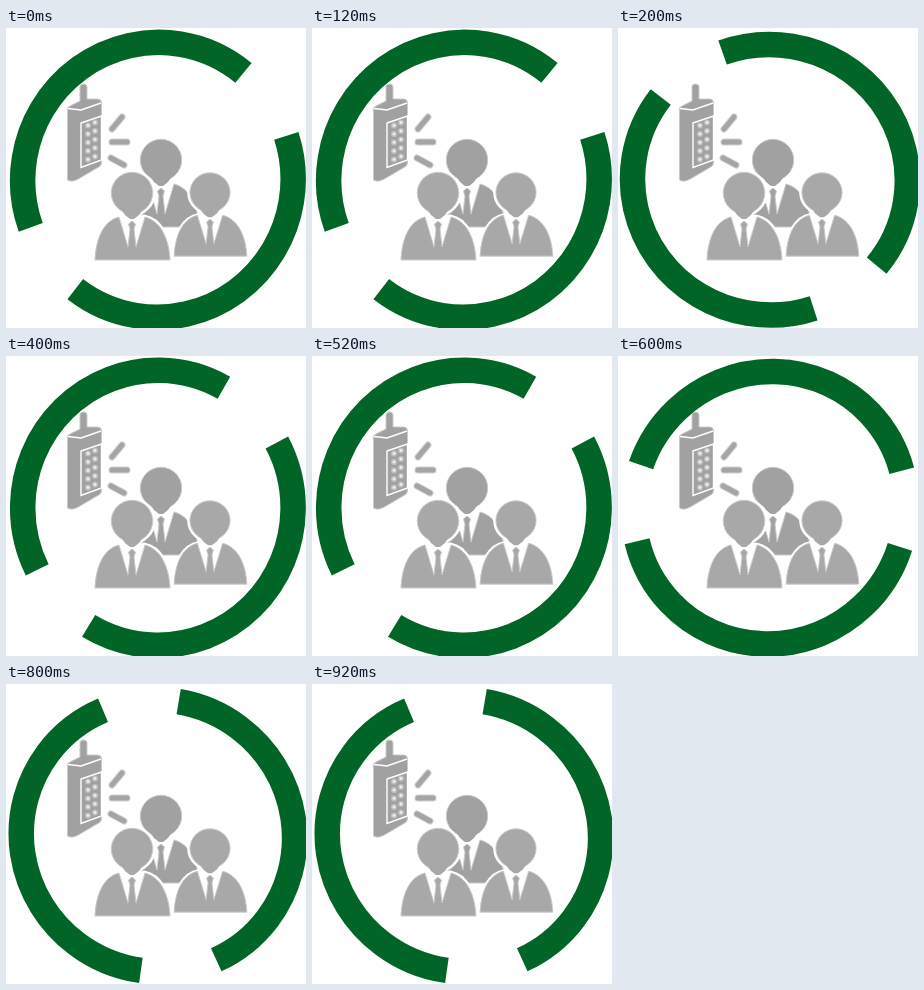
Animation, 300 px wide and 300 px high, one loop 1 s. Source, as an HTML page:

```html
<!DOCTYPE html>
<html lang="en">
<head>
<meta charset="utf-8">
<title>Group call</title>
<style>
  html, body { margin: 0; width: 100%; height: 100%; overflow: hidden; background: #fff; }
  svg { display: block; width: 100%; height: 100%; }
</style>
</head>
<body>
<svg viewBox="0 0 300 300">
  <defs>
    <!-- origin at the centre of the head -->
    <g id="person">
      <g fill="#fff" stroke="#fff" stroke-width="5">
        <circle r="21"/>
        <path d="M-37 67C-36 46 -29 27 -11 24H12C29 27 37 46 38 67Z"/>
      </g>
      <circle r="20.7"/>
      <path d="M-11 16L-7 22L-2 26H2L7 22L11 16Z" stroke="none"/>
      <path d="M-37 67C-36 46 -29 28 -13 24L-4 54L-2 36L-3.500 31L0 28L3.500 31L2 36L4 54L13 24C29 28 37 46 38 67Z"/>
    </g>
    <path id="waves" d="M106 101L116 89M106 114H121M105 130L118 137"/>
  </defs>

  <g fill="#a1a1a1" stroke="#cacaca">
    <use href="#person" x="155" y="132"/>
    <g fill="#a8a8a8">
      <use href="#person" transform="translate(204 164.500) scale(.97 .95)"/>
      <use href="#person" x="126" y="165"/>
    </g>

    <path d="M74 73V59Q74 56 77.500 56Q81 56 81 59V71H92Q95.500 71 95.500 75V134Q96 138 91 140L74 150Q66 155 61.500 152V82Q61 79 64 78Z"/>
    <path d="M62 80.500L75 82L95 75M75 95L95.500 88V132L75 139.500Z" fill="none" stroke="#fff" stroke-width="1.400"/>
    <g id="keys" fill="#eee" stroke="#c0c0c0" stroke-width="1.500"></g>

    <g fill="none" stroke-linecap="round">
      <use href="#waves" stroke="#d0d0d0" stroke-width="7"/>
      <use href="#waves" stroke="#a5a5a5" stroke-width="5"/>
    </g>
  </g>

  <g transform="translate(151.900 151.800)">
    <ellipse id="ring" rx="137.500" ry="135.200" fill="none" stroke="#006526" stroke-width="25.500"
      pathLength="360" stroke-dasharray="146 32.400 149.200 32.400" stroke-dashoffset="-62"/>
  </g>
</svg>
<script>
  const ring = document.getElementById("ring");
  const keys = document.getElementById("keys");
  const turns = [-80.7, 9.4, 91, 136.5, 217];
  const hold = 200;

  for (let i = 0; i < 10; i++) {
    const col = i % 2, row = i >> 1;
    keys.innerHTML += `<circle cx="${82 + 7 * col}" cy="${97.5 + 8.5 * row - 3 * col}" r="2.2"/>`;
  }

  function draw(now) {
    const step = Math.floor(now / hold) % turns.length;
    ring.setAttribute("transform", `rotate(${turns[step]})`);
    requestAnimationFrame(draw);
  }
  draw(performance.now());
</script>
</body>
</html>
```
